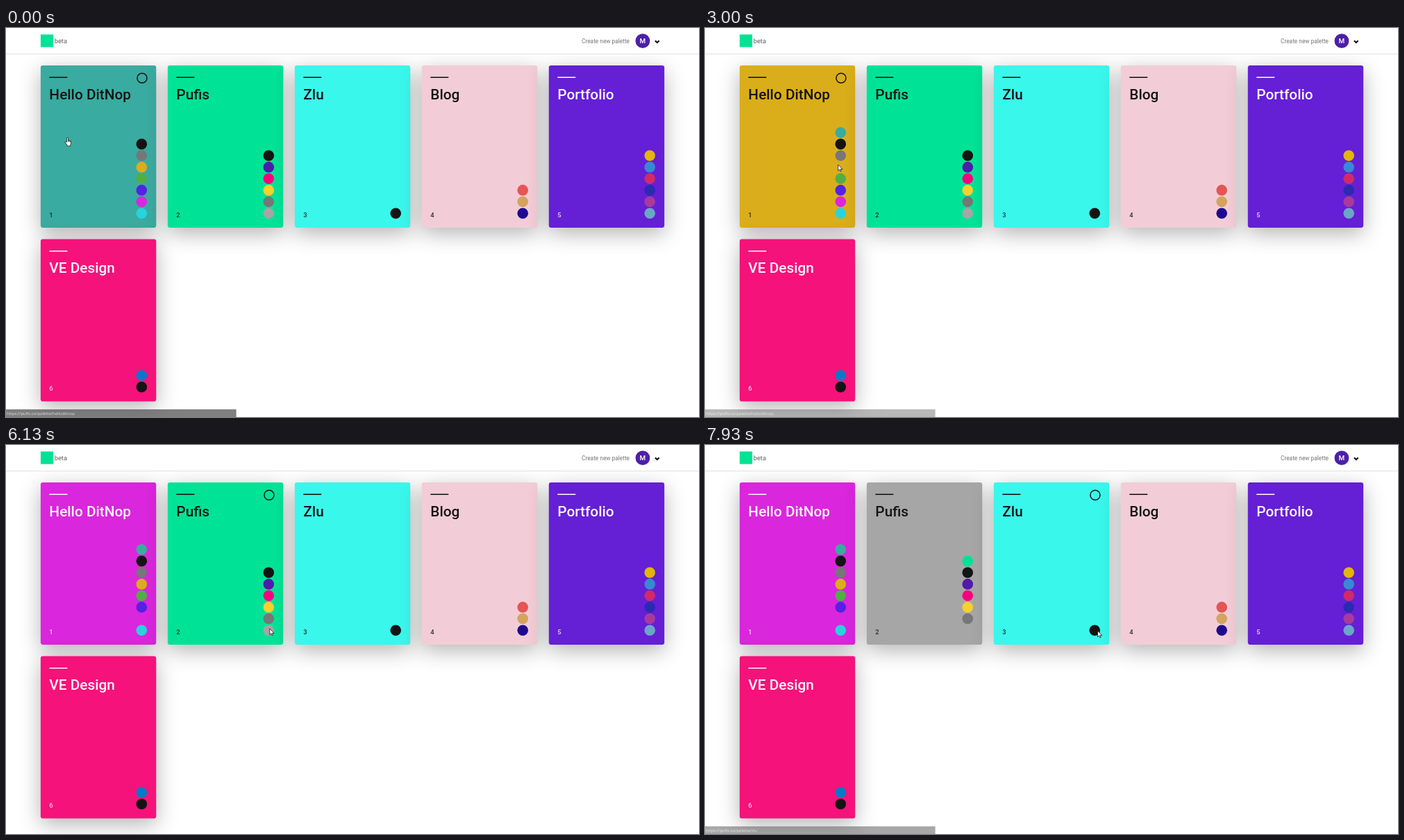
Write an HTML page that moves like this. It is 998x561 px and loops after 8000 ms.

```html
<!DOCTYPE html>
<html lang="en">
<head>
<meta charset="utf-8">
<title>Palettes</title>
<style>
  html, body { margin: 0; width: 100%; height: 100%; overflow: hidden; background: #fff; }
  #stage { position: absolute; width: 1920px; height: 1080px; transform: scale(.5198); transform-origin: 0 0;
    font-family: Roboto, sans-serif; }
  #stage > * { position: absolute; }
  .card { width: 320px; height: 450px; border-radius: 6px; box-shadow: 0 16px 60px rgba(0, 0, 0, .3); }
  .card svg { display: block; }
  .title { font-size: 40px; font-weight: 500; }
  .number { font-size: 18px; font-weight: 500; opacity: .85; }
  .ring { fill: none; stroke: #141414; stroke-width: 3; }
  #header { left: 0; top: 0; background: #fff; }
  #status { left: 0; top: 1058px; width: 638px; height: 22px; background: #4a4a4a; color: #d6d6d6;
    font: 11.5px/21px "Open Sans", sans-serif; text-indent: 2px; }
  #cursor { left: 0; top: 0; overflow: visible; }
  #cursor path { fill: #fff; stroke: #111; stroke-width: 1.5; stroke-linejoin: round; }
</style>
</head>
<body>
<div id="stage">
  <svg id="header" width="1920" height="73">
    <rect y="71" width="1920" height="2" fill="#e2e2e2"/>
    <rect x="96" y="18" width="35" height="35" fill="#00e396"/>
    <text x="134" y="42" font-size="18" fill="#606060">beta</text>
    <text x="1595" y="43" font-size="16" fill="#757575">Create new palette</text>
    <circle cx="1764" cy="36" r="20" fill="#4d1fa8"/>
    <text x="1764" y="43" font-size="19" font-weight="500" text-anchor="middle" fill="#fff">M</text>
    <path d="M1798.500 35L1804 40.500L1809.500 35" fill="none" stroke="#111" stroke-width="4"/>
  </svg>
  <div id="status"></div>
  <svg id="cursor" width="1" height="1">
    <path id="arrow" d="M0 0V17L4 13.500L6.500 19L9 18L6.500 12.500H12Z"/>
    <path id="hand" d="M-2 2Q-2 0 0 0T2 2V8Q3.500 7 4.700 8.300Q6.300 7.500 7.200 9Q9.500 8.700 9.500 11V16Q9.500 18 8 20V23.500H-1V20Q-4 17 -6.500 13.500Q-7 11 -5 11.200Q-3 12 -2 13ZM2 8V12M4.700 8.300V12M7.200 9V12"/>
  </svg>
</div>
<script>
const LOOP = 8000, SCALE = .5198;
const WHITE_TEXT = ['#da26dc', '#651fd5', '#f5127a'];
const STATUS_URL = 'https://pufis.co/palette/';

// The first colour of each palette is its initial background.
const palettes = [
  ['Hello DitNop', '#3aaba0 #141414 #777777 #daae1a #51ae45 #5223e2 #da26dc #27d3dd'],
  ['Pufis', '#00e396 #141414 #4f1ba9 #f9007f #f9d02c #777777 #a6a6a6'],
  ['Zlu', '#3af7eb #141414'],
  ['Blog', '#f2cdd7 #e65454 #d4a35e #1f0a8f'],
  ['Portfolio', '#651fd5 #e2b60c #378ad0 #d12a68 #2a2bb0 #a93a9c #6ba6c7'],
  ['VE Design', '#f5127a #0a78c8 #141414']
];

const clicks = [
  { time: 2870, card: 0, swatch: 3 },
  { time: 4600, card: 0, swatch: 6 },
  { time: 6670, card: 1, swatch: 6 }
];

// Pointer moves in stage pixels: start, end, x, y
const origin = [88.5, 158];
const moves = [
  [930, 1070, 94.5, 158],
  [1470, 2340, 183.5, 191.5],
  [2340, 2670, 191.7, 197],
  [3600, 4330, 198.3, 248],
  [5400, 6130, 379.8, 264.8],
  [7130, 7470, 552.5, 275],
  [7470, 7670, 569, 276],
  [7670, 7930, 565.5, 268]
];

const $ = id => document.getElementById(id);
const clamp = v => Math.max(0, Math.min(1, v));
const smooth = u => u * u * (3 - 2 * u);

const cards = palettes.map(([name, list], i) => {
  const colors = list.split(' ');
  const left = 96 + 352 * (i % 5), top = 104 + 482 * Math.floor(i / 5);
  const swatchY = k => 410 - 32 * (colors.length - 1 - k);
  const el = document.createElement('div');
  el.className = 'card';
  el.style.left = left + 'px';
  el.style.top = top + 'px';
  el.innerHTML = `<svg width="320" height="450">
    <g class="ink"><rect x="24" y="31.5" width="50" height="3"/>
    <text class="title" x="24" y="93.5">${name}</text>
    <text class="number" x="24" y="421">${i + 1}</text></g>
    <circle class="ring" cx="281" cy="35" r="13.5"/>
    ${colors.map((c, k) => `<circle cx="279.7" cy="${swatchY(k)}" r="15" fill="${c}"/>`).join('')}</svg>`;
  $('stage').insertBefore(el, $('header'));
  return { el, colors, left, top, swatchY, ink: el.querySelector('.ink'), ring: el.querySelector('.ring') };
});

function pointerAt(t) {
  let [x, y] = origin;
  for (const [start, end, toX, toY] of moves) {
    const u = smooth(clamp((t - start) / (end - start)));
    x += (toX - x) * u;
    y += (toY - y) * u;
  }
  return [x / SCALE, y / SCALE];
}

function statusOpacity(t) {
  if (t < 70) return .7;
  if (t < 2870) return 1;
  return t < 7930 ? clamp((3130 - t) / 330) : .48;
}

function draw(t) {
  const [x, y] = pointerAt(t);
  let hand = false;
  cards.forEach((card, i) => {
    const dx = x - card.left, dy = y - card.top;
    const hover = dx >= 0 && dx <= 320 && dy >= 0 && dy <= 450;
    const onSwatch = card.colors.some((c, k) => Math.hypot(dx - 279.7, dy - card.swatchY(k)) < 15);
    if (hover && !onSwatch) hand = true;
    const click = clicks.filter(c => c.card === i && c.time <= t).pop();
    const color = card.colors[click ? click.swatch : 0];
    card.el.style.background = color;
    card.ink.setAttribute('fill', WHITE_TEXT.includes(color) ? '#fbf5fc' : '#141414');
    card.ring.style.display = hover ? '' : 'none';
  });
  $('cursor').style.transform = `translate(${x}px, ${y}px)`;
  $('hand').style.display = hand ? '' : 'none';
  $('arrow').style.display = hand ? 'none' : '';
  $('status').textContent = STATUS_URL + (t < 5000 ? 'helloditnop' : 'zlu');
  $('status').style.opacity = statusOpacity(t);
}

const startTime = performance.now();
function tick() {
  draw((performance.now() - startTime) % LOOP);
  requestAnimationFrame(tick);
}
tick();
</script>
</body>
</html>
```
